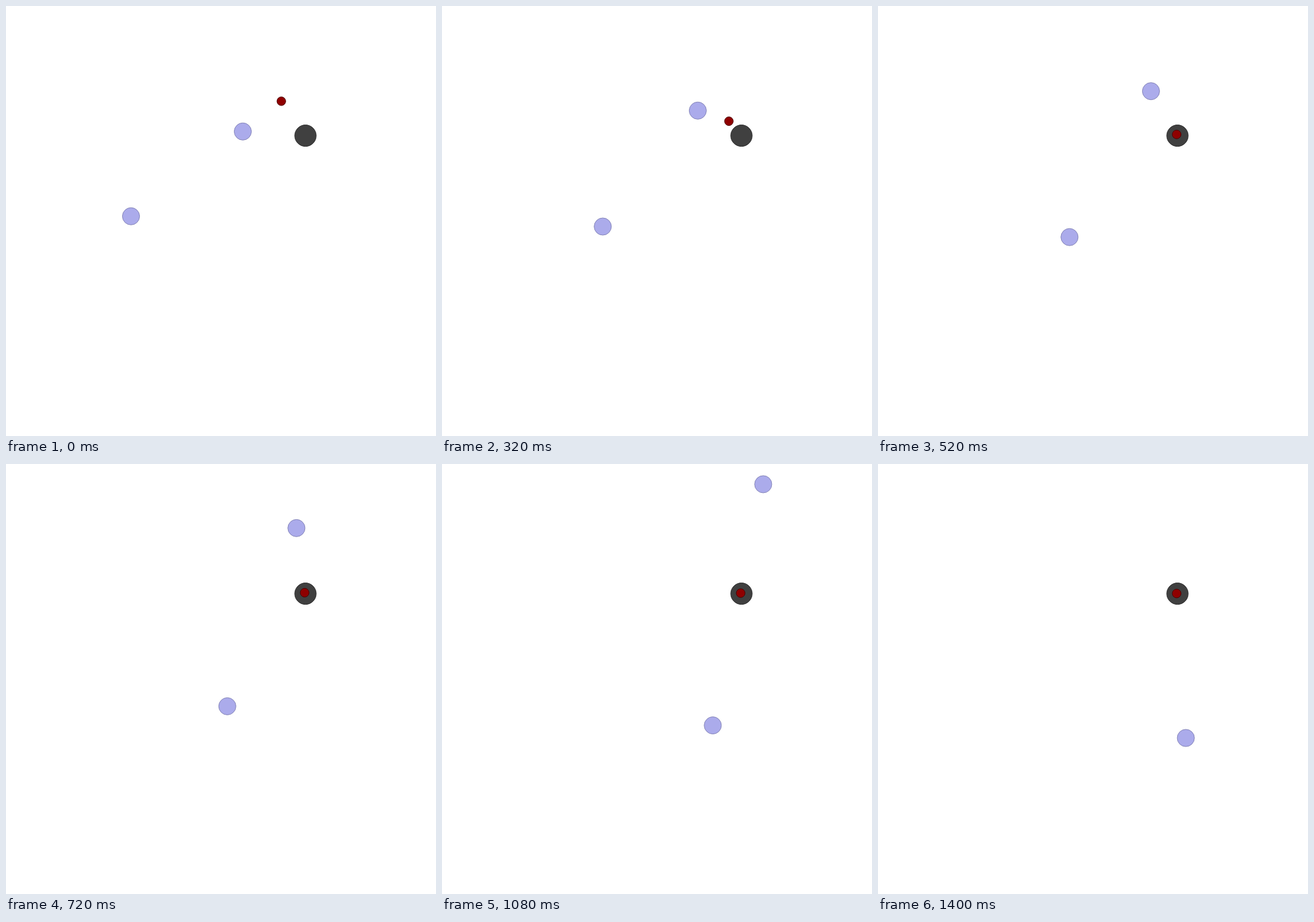
Write an HTML page that moves like this. It is 700 px wide and 700 px high and loops after 1440 ms.

```html
<!DOCTYPE html>
<html lang="en">
<head>
<meta charset="utf-8">
<title>Balls and hole</title>
<style>
  html, body { margin: 0; width: 100%; height: 100%; overflow: hidden; background: #fff; }
  svg { display: block; width: 100vw; height: 100vh; }
  .ball { fill: #ababeb; stroke: #8585b8; }
  .hole { fill: #404040; stroke: #2a2a2a; }
  .shot { fill: #8f0000; stroke: #4c0000; }
</style>
</head>
<body>
<svg viewBox="0 0 700 700">
  <circle class="hole" cx="487.5" cy="211.1" r="17.5"/>
  <circle class="ball" id="low" r="14"/>
  <circle class="ball" id="high" r="14"/>
  <circle class="shot" id="shot" r="7.1"/>
</svg>
<script>
const LOOP = 1440, STEP = 40;
const RAMP = 4.5;     // steps until full speed
const CAPTURE = 9.9;  // travel at which the shot drops into the hole
const SINK = 0.08;    // slow settling inside the hole

const low = document.getElementById("low");
const high = document.getElementById("high");
const shot = document.getElementById("shot");

// Constant acceleration from rest, then steady
const travel = t => t < RAMP ? t * t / (2 * RAMP) : t - RAMP / 2;

// Start, velocity, acceleration and its change
const along = (s, p, v, a, j = 0) => p + s * (v + s * (a + s * j));

function place(el, x, y) {
  el.setAttribute("cx", x.toFixed(2));
  el.setAttribute("cy", y.toFixed(2));
}

function draw(now) {
  const s = travel(Math.floor((now % LOOP) / STEP));
  place(low,
    along(s, 203.5, 10.1, 0.011, -0.00128),
    along(s, 342.3, 2.51, 0.079, -0.0018));
  place(high,
    along(s, 385.5, 5.2, 0.035, -0.00084),
    along(s, 204.3, -5.76, -0.0205, -0.00107));

  const flight = Math.min(s, CAPTURE);
  place(shot,
    along(flight, 448.2, 2.5, 0.135),
    along(flight, 155, 5.95, -0.05) + SINK * (s - flight));
}

const start = performance.now();
function tick() {
  draw(performance.now() - start);
  requestAnimationFrame(tick);
}
tick();
</script>
</body>
</html>
```
